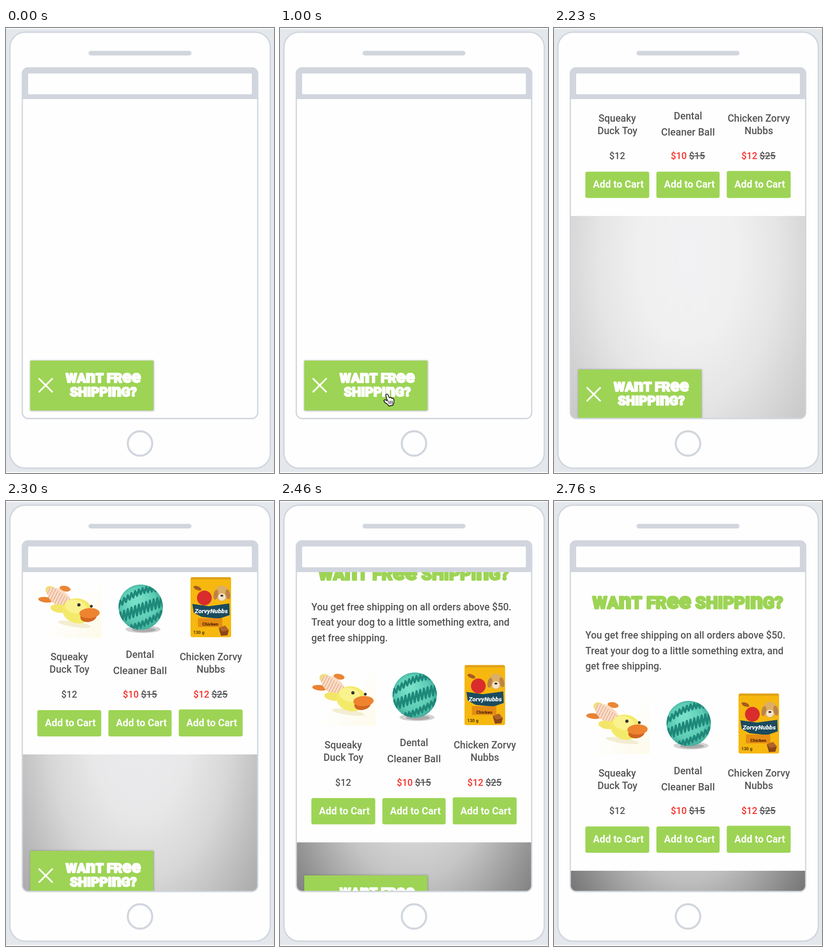
Recreate the animation shown at these times as an HTML page with a canvas. Size 581 px wide and 964 px high, loop 5 s.

```html
<!DOCTYPE html>
<html lang="en">
<head>
<meta charset="utf-8">
<title>Free shipping popup</title>
<style>
html, body { margin: 0; width: 100%; height: 100%; overflow: hidden; background: #fefefe; }
canvas { display: block; }
</style>
</head>
<body>
<canvas id="stage" width="581" height="964"></canvas>
<script>
const ctx = document.getElementById('stage').getContext('2d');
const LOOP = 5000, STEP = 100 / 3;
const GREEN = '#9dd455', LINE = '#d1d6de', BAR = '#d1d5de', WHITE = '#fefefe';
const INK = '#555557', RED = '#f8302a';
const POPUP_HEIGHT = 647;

function box(x, y, w, h, r, fill) {
  ctx.beginPath();
  ctx.roundRect(x, y, w, h, r);
  if (fill) { ctx.fillStyle = fill; ctx.fill(); }
}

function outline(color, width) {
  ctx.strokeStyle = color;
  ctx.lineWidth = width;
  ctx.stroke();
}

function oval(x, y, rx, ry, fill, angle = 0) {
  ctx.beginPath();
  ctx.ellipse(x, y, rx, ry, angle, 0, Math.PI * 2);
  ctx.fillStyle = fill;
  ctx.fill();
}

function poly(points, fill) {
  ctx.beginPath();
  points.forEach(([x, y]) => ctx.lineTo(x, y));
  ctx.closePath();
  ctx.fillStyle = fill;
  ctx.fill();
}

function label(str, x, y, size = 21.3, color = INK, weight = 500, align = 'center') {
  ctx.font = `${weight} ${size}px Roboto, sans-serif`;
  ctx.textAlign = align;
  ctx.fillStyle = color;
  ctx.fillText(str, x, y);
}

// Unicase display lettering: lowercase n and e are raised to cap height.
function display(str, cx, y, size, color) {
  const fontFor = ch => `900 ${/[ne]/.test(ch) ? size * 1.32 : size}px Roboto, sans-serif`;
  const widths = [...str].map(ch => {
    ctx.font = fontFor(ch);
    return ctx.measureText(ch).width;
  });
  let x = cx - widths.reduce((a, b) => a + b, 0) / 2;
  ctx.textAlign = 'left';
  ctx.fillStyle = ctx.strokeStyle = color;
  ctx.lineWidth = size * 0.09;
  ctx.lineJoin = 'round';
  [...str].forEach((ch, i) => {
    ctx.font = fontFor(ch);
    ctx.fillText(ch, x, y);
    ctx.strokeText(ch, x, y);
    x += widths[i];
  });
}

function clamp(v) { return Math.min(1, Math.max(0, v)); }

// cubic-bezier(.25, .1, .25, 1)
function ease(x) {
  if (x <= 0 || x >= 1) return clamp(x);
  let lo = 0, hi = 1, s;
  for (let i = 0; i < 24; i++) {
    s = (lo + hi) / 2;
    if (0.75 * s * (1 - s) + s ** 3 < x) lo = s; else hi = s;
  }
  return 0.3 * s * (1 - s) ** 2 + 3 * s * s * (1 - s) + s ** 3;
}

function drawPhone() {
  ctx.fillStyle = WHITE;
  ctx.fillRect(0, 0, 581, 964);
  ctx.fillStyle = '#e4e8ed';
  ctx.fillRect(0, 2, 581, 960);
  box(8.5, 9, 564.5, 944.5, 33, WHITE);
  outline(LINE, 3);
  box(179, 49.5, 223, 10, 5, BAR);
  ctx.beginPath();
  ctx.arc(290.5, 900, 26.5, 0, Math.PI * 2);
  outline(LINE, 4.5);
}

function drawScreenFrame() {
  box(34, 85, 513, 69, [14, 14, 0, 0], BAR);
  box(48, 98.5, 485, 45, 2, WHITE);
  box(35.3, 86.5, 510.4, 759.5, 13);
  outline(LINE, 2.8);
}

function drawOverlay(alpha) {
  ctx.save();
  ctx.globalAlpha = alpha;
  ctx.translate(290.5, 500);
  ctx.scale(335, 550);
  const shade = ctx.createRadialGradient(0, 0, 0, 0, 0, 1);
  shade.addColorStop(0, '#dfdfe4');
  shade.addColorStop(0.32, '#dadadc');
  shade.addColorStop(0.58, '#bfbfbf');
  shade.addColorStop(0.85, '#8c8c8c');
  shade.addColorStop(1, '#727272');
  ctx.fillStyle = shade;
  ctx.fillRect(-1, -1, 2, 2);
  ctx.restore();
}

function drawTeaser(dy) {
  ctx.save();
  ctx.translate(0, dy);
  ctx.shadowColor = 'rgba(70,70,90,.55)';
  ctx.shadowBlur = 4;
  box(52.5, 720.5, 267, 108, 0, GREEN);
  ctx.shadowColor = 'transparent';
  ctx.beginPath();
  ctx.moveTo(72, 760); ctx.lineTo(100, 788);
  ctx.moveTo(100, 760); ctx.lineTo(72, 788);
  ctx.lineCap = 'round';
  outline(WHITE, 3.6);
  display('WAnT FRee', 211, 767.5, 28, WHITE);
  display('SHIPPInG?', 211, 797.5, 28, WHITE);
  ctx.restore();
}

function drawDuck() {
  const glow = ctx.createLinearGradient(70, 414, 207, 548);
  glow.addColorStop(0.5, WHITE);
  glow.addColorStop(1, '#fdfae8');
  box(70, 414, 137, 134, 0, glow);
  oval(148, 519, 36, 6, '#f3edd2', 0.15);
  oval(86, 466, 16, 6, '#e98334', 0.1);
  oval(128, 442, 12, 6, '#ea8636', 0.2);
  oval(98, 447, 13, 10, '#f2dc7a', 0.5);
  ctx.save();
  oval(115, 461, 29, 17, '#fbdcc4', 0.6);
  ctx.clip();
  for (let i = 0; i < 11; i++) {
    ctx.beginPath();
    ctx.moveTo(98 + i * 5, 436 + i * 3.5);
    ctx.lineTo(82 + i * 5, 468 + i * 3.5);
    outline('#e0a48c', 1.4);
  }
  ctx.restore();
  oval(115, 485, 19, 9, '#f3e568', 0.15);
  oval(155, 490, 33, 27, '#f4ea6a', 0.2);
  oval(151, 481, 23, 15, '#f9f28e', 0.2);
  oval(179, 502, 18, 12, '#d2651f', -0.2);
  oval(181, 495, 22, 11, '#ee8330', -0.05);
  oval(158, 477, 3.5, 3.5, '#34322b');
  oval(185, 480, 3, 3, '#34322b');
}

function zigzag(y, bend, slope, size) {
  ctx.beginPath();
  for (let i = 0; i <= 26; i++) {
    const u = i / 26;
    const arch = bend * 4 * u * (1 - u);
    ctx.lineTo(240 + 104 * u, y - slope * (u - 0.5) - arch + (i % 2 ? size : -size));
  }
  outline('#1f8879', 4.5);
}

function drawBall() {
  oval(297, 530, 38, 8, '#d2d2d2');
  oval(299, 531, 26, 5, '#aaaaaa');
  ctx.save();
  const skin = ctx.createRadialGradient(280, 465, 8, 292, 482, 52);
  skin.addColorStop(0, '#78dfc8');
  skin.addColorStop(0.7, '#5bcbb4');
  skin.addColorStop(1, '#3ba896');
  oval(292, 482, 48, 49, skin);
  ctx.clip();
  ctx.lineJoin = 'round';
  zigzag(462, 14, 38, 6);
  zigzag(488, 2, 40, 11);
  zigzag(512, -8, 42, 6);
  ctx.restore();
}

function drawPack() {
  box(400, 417, 88, 130, 4, '#f6b80f');
  box(401, 417, 86, 5, 3, '#dfa218');
  oval(415, 441, 9, 4, '#a65b20', 0.4);
  oval(468, 452, 15, 17, '#dcae66');
  oval(455, 455, 5, 11, '#bd8344', 0.2);
  oval(481, 454, 5, 11, '#bd8344', -0.2);
  oval(468, 460, 8, 8, '#f3e3c8');
  oval(468, 457, 3, 2, '#3a2a20');
  oval(430, 462, 16, 16, '#d92d2d');
  poly([[404, 475], [440, 480], [484, 474], [485, 499], [462, 507], [424, 503], [407, 494]], '#1b4b5f');
  box(416, 506, 53, 19, 1, '#e58c13');
  label('ZorvyNubbs', 445, 495, 13.5, WHITE, 'italic 900');
  label('Chicken', 443, 522, 9.5, '#53240b', 900);
  label('130 g', 418, 540, 9.5, '#51330b', 700);
  poly([[461, 527], [475, 522], [483, 532], [480, 543], [466, 544]], '#8c451a');
  poly([[461, 527], [475, 522], [483, 532], [469, 535]], '#b06428');
}

function drawPrice(x, now, before) {
  label(now, x - 20, 678, 20.2, RED);
  label(before, x + 19.5, 678, 20.2);
  ctx.fillStyle = INK;
  ctx.fillRect(x + 2, 670, 35, 1.8);
}

function drawPopup(dy) {
  ctx.save();
  ctx.translate(0, dy);
  box(36, 154, 510, POPUP_HEIGHT, 0, WHITE);
  display('WAnT FRee SHIPPInG?', 290, 232.8, 36.8, GREEN);
  ['You get free shipping on all orders above $50.',
   'Treat your dog to a little something extra, and',
   'get free shipping.'
  ].forEach((line, i) => label(line, 68, 298 + i * 33.5, 21.2, INK, 500, 'left'));

  drawDuck();
  drawBall();
  drawPack();

  label('Squeaky', 137, 597);
  label('Duck Toy', 137.5, 624);
  label('Dental', 290.5, 592);
  label('Cleaner Ball', 290.5, 627, 21.7);
  label('Chicken Zorvy', 444, 597);
  label('Nubbs', 444, 624);

  label('$12', 137, 678, 20.2);
  drawPrice(290.5, '$10', '$15');
  drawPrice(443.5, '$12', '$25');

  [[68, 705, 138.5], [222, 705, 137], [374.5, 703.5, 138.5]].forEach(([x, y, w]) => {
    box(x, y, w, 762 - y, 4, GREEN);
    label('Add to Cart', x + 71.5, 740, 21.5, WHITE, 700);
  });
  ctx.restore();
}

function drawHand(x, y) {
  ctx.save();
  ctx.translate(x, y);
  ctx.lineJoin = ctx.lineCap = 'round';
  poly([[5, 3], [7, 1], [10, 2], [13, 9], [16, 8], [18, 10], [21, 10], [23, 13],
        [23, 19], [21, 25], [12, 27], [9, 23], [3, 19], [1, 15], [4, 13], [9, 16]], WHITE);
  outline('#1c1c1c', 1.8);
  ctx.beginPath();
  for (const px of [12, 15.5, 19]) {
    ctx.moveTo(px, 16);
    ctx.lineTo(px + 0.8, 22);
  }
  outline('#1c1c1c', 1.4);
  ctx.restore();
}

function render(ms) {
  const t = Math.floor((ms + 7) / STEP) * STEP;
  const opening = t > 2140;
  const progress = opening ? ease((t - 2088) / 600) : 0;
  const drop = opening ? 19.5 * ((t - 2133.3) / 100) ** 1.275 : 0;

  drawPhone();
  ctx.save();
  box(36, 154, 510, 691, [0, 0, 13, 13]);
  ctx.clip();
  if (opening) drawOverlay(progress);
  if (drop < 130) drawTeaser(drop);
  if (opening) drawPopup((progress - 1) * POPUP_HEIGHT);
  ctx.restore();
  drawScreenFrame();

  if (t > 495 && t < 2130) {
    const u = clamp((t - 500) / 500);
    const left = 1 - u * u * (3 - 2 * u);
    drawHand(224 + 307 * left, 792 + 67 * left);
  }
}

const start = performance.now();
function tick() {
  render((performance.now() - start) % LOOP);
  requestAnimationFrame(tick);
}
tick();
</script>
</body>
</html>
```
